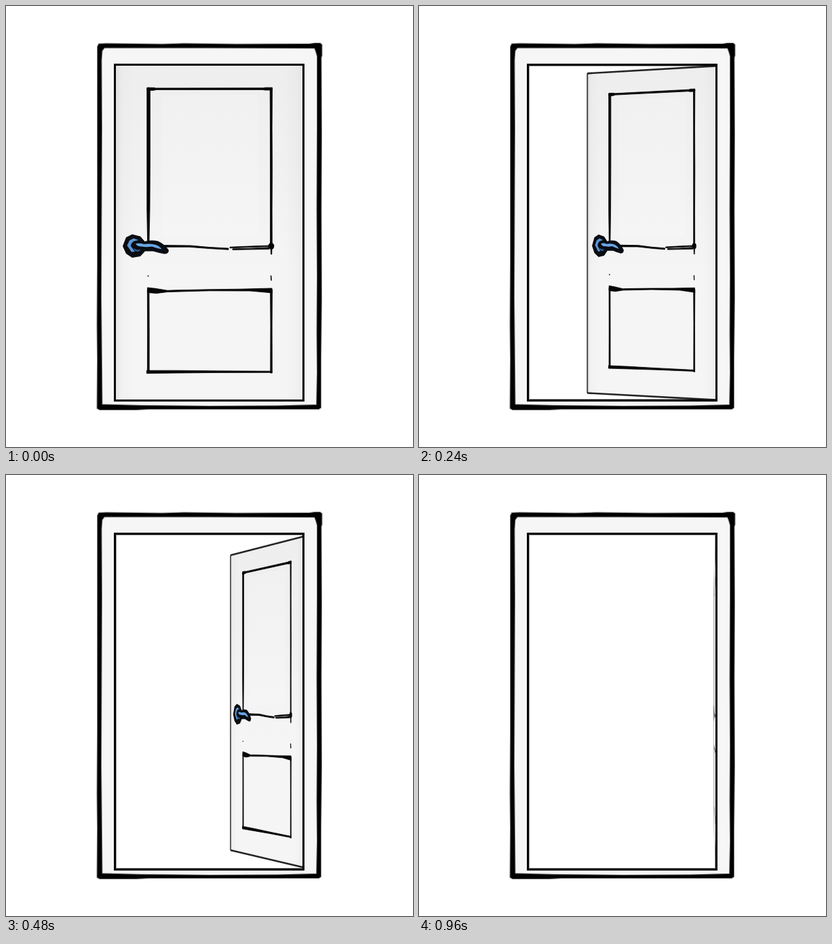
An HTML page for the animation above (1 s loop, 600x650 px).

```html
<!DOCTYPE html>
<html lang="en">
<head>
<meta charset="utf-8">
<title>Opening door</title>
<style>
  html, body { margin: 0; width: 100%; height: 100%; overflow: hidden; background: #fff; }
  svg { display: block; width: 600px; height: 650px; }
</style>
</head>
<body>
<svg viewBox="0 0 600 650">
  <defs>
    <linearGradient id="shade" x1="0" y1="0" x2="0" y2="1">
      <stop offset="0" stop-color="#eeeeee"/>
      <stop offset=".35" stop-color="#f1f1f1"/>
      <stop offset=".6" stop-color="#f5f5f5"/>
      <stop offset="1" stop-color="#f5f5f5"/>
    </linearGradient>
    <linearGradient id="sides">
      <stop offset="0" stop-color="#000" stop-opacity=".07"/>
      <stop offset=".03" stop-color="#000" stop-opacity=".015"/>
      <stop offset=".1" stop-color="#000" stop-opacity="0"/>
      <stop offset=".9" stop-color="#000" stop-opacity="0"/>
      <stop offset="1" stop-color="#000" stop-opacity=".03"/>
    </linearGradient>
  </defs>
  <path fill="#f6f6f6" fill-rule="evenodd" d="M138 59H462V592H138Z M160 86V582H439V86Z"/>
  <rect x="162.5" y="88.5" width="274" height="491" fill="none" stroke="#000" stroke-opacity=".4"/>
  <g id="door"></g>
  <rect x="160.5" y="86.5" width="278" height="495" fill="none" stroke="#000" stroke-width="3"/>
  <path fill="#000" fill-rule="evenodd" stroke="#000" stroke-opacity=".5" stroke-width="2" d="
    M137 56L148 55.5L230 56.5L262 55.5L340 56.5L448 56L455 55H463L465.500 57L465.500 73L464.500 76L465 190L464.500 300L465 430L464 520L464 592L461 594L300 594L210 594L192 595L138 595L134.500 593L135 520L134.500 470L135 380L135 250L135 150L135 60Z
    M145 61.5L141.500 66L140.500 80L141 180L140.500 300L140 430L141 530L141.500 587.500L200 589L300 590L400 589.500L458 588L459 540L458.500 480L459 400L458.500 300L459 180L459 74L457 67L455 62L300 61.500Z"/>
</svg>
<script>
const LOOP = 1000, STEP = 40;
const HINGE = 438, EDGE = 162, TOP = 88, BOTTOM = 581, EYE = 343.5;

// Keys: time, x of the free edge, vertical shrink at the free edge.
const KEYS = [
  [0, 162, 0], [160, 218, .025], [320, 278, .067], [480, 331, .118],
  [560, 348, .139], [640, 370, .162], [800, 406, .223], [960, 434.5, .285]
];

const rect = (x1, y1, x2, y2) => `M${x1} ${y1}L${x2} ${y1}L${x2} ${y2}L${x1} ${y2}Z`;
const slab = rect(EDGE, TOP, HINGE, BOTTOM);

const lines = [
  // upper panel
  "M207.8 121L212.4 121L212.4 230L212 300L211 347L208.6 347L207.8 300Z",
  "M208 120.2L219 120.4L220 121L380 120.8L382 120.2L392.5 120.2L392.5 124L382 124L378 123.4L222 123.4L217 124.4L208 124.4Z",
  "M389.2 121L392.6 121L392.2 180L392.6 240L392.2 300L392.4 348L391.8 366L390.6 366L389.6 348L389.6 240L389.4 150Z",
  "M387 354Q387 349.5 391 349.5Q395 349.5 395 354Q395 358 391.500 358.5Q387 358 387 354Z",
  "M232 352.6L272 353L300 355.5L328 357L328 359.2L300 357.6L270 355.3L234 355.3Z",
  "M330 355.2L360 354L389 353L389 354.6L350 356L330 356.8Z",
  "M334 357.8L360 357.2L388 355.8L388 358.4L365 358.8L334 359.4Z",
  // gap marks
  rect(209, 397.5, 210, 398.5),
  "M390.2 397.5L391 397.5L391.4 404.5L390.8 404.5Z",
  // lower panel
  "M208.5 415L220 416.3L238 419.2L250 418.8L300 417.8L345 417.2L392 416L392.6 423.5L388 422.5L360 420L300 419.8L238 421.5L222 423.5L208.5 422.5Z",
  "M208.4 418L211 418L211.2 480L211.2 541L208.4 541L208.6 480Z",
  "M389.6 418L392.6 418L392.2 470L392.4 541L389.8 541L390 470Z",
  "M207.4 537.2L250 537.2L310 537.8L392 538.2L392 540.2L310 540.4L250 541L207.4 541.5Z"
];

const handle = [
  ["#0a0d12", "M172 354L177 341L186 336.5L198 339.5L204.5 347Q214 344.5 224 346.500Q234 351 240 360Q240 365 234 365.500Q225 364 217 361.500L205 361.500L198 369L186 371L177 365Z"],
  ["#5b97d6", "M178.5 353L182 345.5L188 342.5L195.5 345L189 346.5Q184 349 184 354L190 362L185 362.5Z"],
  ["#6aa6e6", "M191 350.5Q197 349 203 351Q214 349.5 221 352Q227 354.5 229.5 358.5Q222 357 215 354.500Q207 356 200 354.500Q194 355 191 350.5Z"],
  ["#2f6299", "M188 357L193 359.5L199 359L195 362L190 361Z"]
];

const door = document.getElementById("door");
const parts = [];

function add(d, attrs) {
  const el = document.createElementNS("http://www.w3.org/2000/svg", "path");
  for (const key in attrs) el.setAttribute(key, attrs[key]);
  door.append(el);
  parts.push({ el, d });
  return el;
}

const edge = { fill: "none", stroke: "#000" };
add(slab, { fill: "url(#shade)" });
add(rect(230, 131, 372, 340), { fill: "#fff", "fill-opacity": .12 });
add(slab, { fill: "url(#sides)" });
const ends = [TOP, BOTTOM].map(y => add(`M${EDGE} ${y}L${HINGE} ${y}`, { ...edge, "stroke-width": 2.6 }));
const side = add(`M${EDGE} ${TOP}L${EDGE} ${BOTTOM}`, { ...edge, "stroke-width": 2 });
const ink = lines.map(d => add(d, { fill: "#050505", stroke: "#050505", "stroke-opacity": .8 }));
for (const [fill, d] of handle) add(d, { fill });

// Smooth curve through the keys.
function sample(t, col) {
  const last = KEYS.length - 1;
  let i = 0;
  while (i < last - 1 && t >= KEYS[i + 1][0]) i++;
  const slope = k => {
    const a = KEYS[Math.max(k - 1, 0)], b = KEYS[Math.min(k + 1, last)];
    return (b[col] - a[col]) / (b[0] - a[0]);
  };
  const a = KEYS[i], b = KEYS[i + 1], span = b[0] - a[0];
  const p = (t - a[0]) / span, q = 1 - p;
  return a[col] * q * q * (1 + 2 * p) + b[col] * p * p * (3 - 2 * p)
    + span * p * q * (slope(i) * q - slope(i + 1) * p);
}

function draw(t) {
  const scale = (HINGE - sample(t, 1)) / (HINGE - EDGE);
  const near = sample(t, 2), far = .8 * near * near;
  const project = (_, x, y) => {
    const u = (x - EDGE) / (HINGE - EDGE);
    const shrink = near + (far - near) * u;
    return (HINGE - (HINGE - x) * scale).toFixed(2) + " " + (EYE + (y - EYE) * (1 - shrink)).toFixed(2);
  };
  for (const { el, d } of parts) el.setAttribute("d", d.replace(/([\d.]+) ([\d.]+)/g, project));
  const shown = Math.min(1, t / 160);
  for (const el of ends) el.setAttribute("stroke-opacity", shown * Math.min(.85, scale * 8));
  side.setAttribute("stroke-opacity", shown * Math.min(.7, .1 + scale * 1.3));
  for (const el of ink) el.setAttribute("stroke-width", Math.min(1, scale * 6));
}

function tick(now) {
  draw(Math.floor((now % LOOP) / STEP) * STEP);
  requestAnimationFrame(tick);
}
draw(0);
requestAnimationFrame(tick);
</script>
</body>
</html>
```
